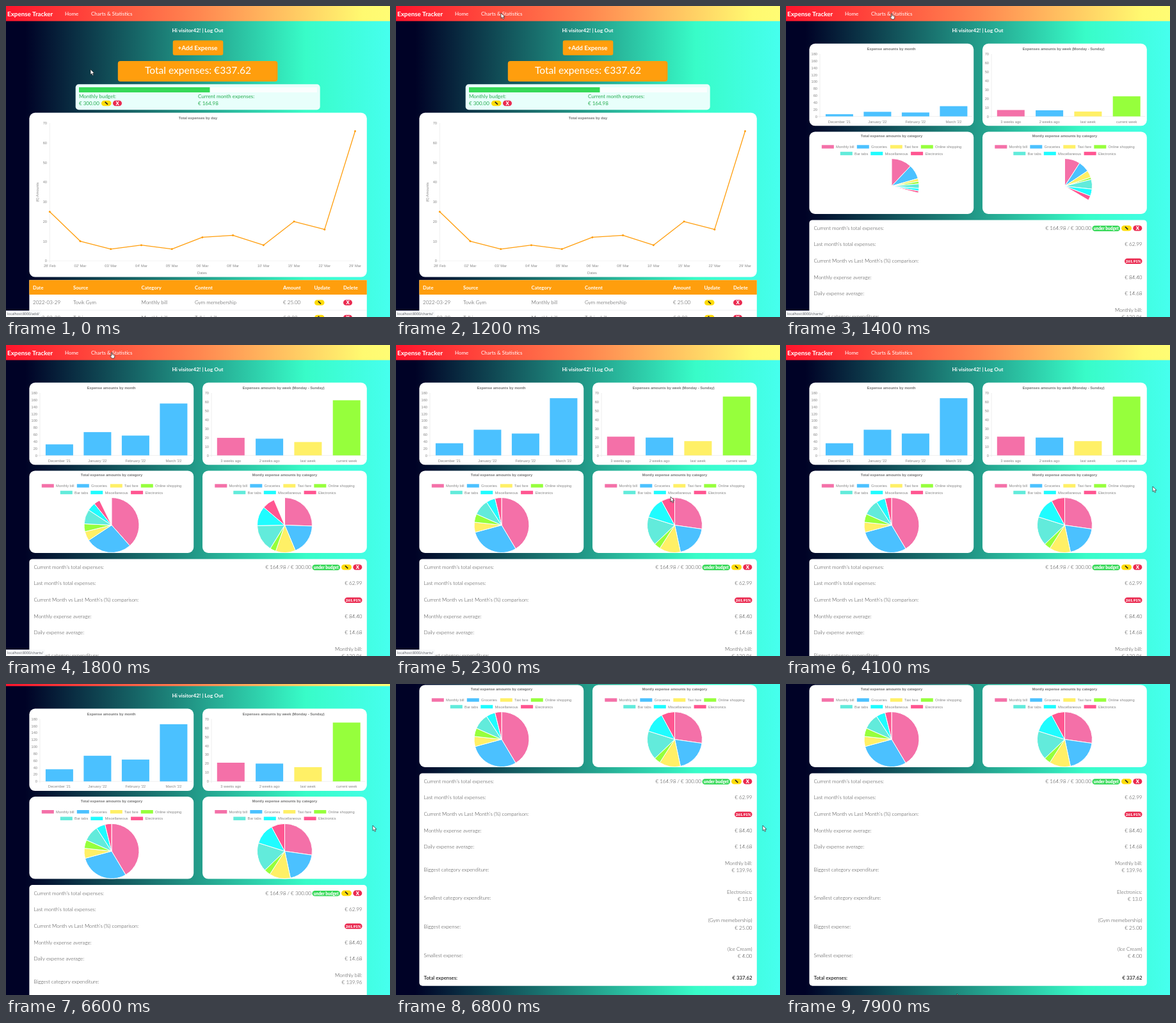
Animation, 600 px wide and 486 px high, one loop 8 s. Source, as an HTML page:

```html
<!DOCTYPE html>
<html lang="en">
<head>
<meta charset="utf-8">
<title>Expense Tracker</title>
<style>
html, body { margin: 0; width: 100%; height: 100%; overflow: hidden; background: #000226; }
svg { display: block; width: 100%; height: 100%; }
text { font-family: Lato, sans-serif; white-space: pre; }
text.c { font-family: "Liberation Sans", Arial, sans-serif; }
text.s { font-family: "Open Sans", sans-serif; }
</style>
</head>
<body>
<svg id="stage" viewBox="0 0 600 486" xmlns="http://www.w3.org/2000/svg"></svg>
<script>
const LOOP = 8000, STEP = 100, PAGE_AT = 1400;
const ORANGE = '#ff9e0d', YELLOW = '#ffdc0a', RED = '#ea2a50', GREEN = '#36d958', INK = '#3c3c3c';
const PINK = '#f470a8', BLUE = '#4bc1ff', LEMON = '#fff066', LIME = '#96ff3c';
const PALETTE = [PINK, BLUE, LEMON, LIME, '#62ebdb', '#1ffcff', '#ff5691'];
const CATEGORIES = ['Monthly bill', 'Groceries', 'Taxi fare', 'Online shopping', 'Bar tabs', 'Miscellaneous', 'Electronics'];
const LEFT = 36.4, WIDTH = 527.4;

const rect = (x, y, w, h, fill, r = 0) =>
  `<rect x="${x}" y="${y}" width="${w}" height="${h}" rx="${r}" fill="${fill}"/>`;

// y is the middle of the capitals
const text = (str, x, y, { size = 8, fill = INK, weight = 300, anchor = 'start', cls = '', extra = '' } = {}) =>
  `<text class="${cls}" x="${x}" y="${(y + size * 0.36).toFixed(2)}" font-size="${size}" fill="${fill}" ` +
  `font-weight="${weight}" text-anchor="${anchor}" ${extra}>${str.replace(/&/g, '&amp;')}</text>`;

const label = (str, x, y, anchor = 'middle', opts = {}) =>
  text(str, x, y, { size: 5.7, fill: '#858585', weight: 400, anchor, cls: 'c', ...opts });

const title = (str, x, y) => label(str, x, y, 'middle', { weight: 700, fill: '#747474' });

const line = (x1, y1, x2, y2, stroke, w = 0.6) =>
  `<path d="M${x1} ${y1}L${x2} ${y2}" stroke="${stroke}" stroke-width="${w}" fill="none"/>`;

const pill = (str, x, y, w, fill, size = 6.4) =>
  rect(x, y - 4.3, w, 8.6, fill, 4.3) +
  text(str, x + w / 2, y, { size, fill: '#fff', weight: 900, anchor: 'middle' });

const editPill = (x, y, w = 15.5) =>
  rect(x, y - 4.3, w, 8.6, YELLOW, 4.3) +
  line(x + w / 2 - 2, y - 2.2, x + w / 2 + 2.2, y + 1.9, '#222', 1.7);

const deletePill = (x, y) => pill('X', x, y, 14, RED, 7.6);

function header() {
  const link = { fill: '#fff', weight: 400 };
  return rect(0, 0, 600, 23.6, 'url(#nav)') +
    text('Expense Tracker', 2, 12, { size: 9.9, fill: '#fff', weight: 700 }) +
    text('Home', 92, 12, link) +
    text('Charts & Statistics', 133, 12, link) +
    text('Hi visitor42! | Log Out', 299.5, 38.5, { size: 8.2, fill: '#fff', weight: 700, anchor: 'middle' });
}

function budget() {
  const g = { fill: '#27ac50', weight: 400 };
  return rect(108.7, 122.3, 382, 40, '#e8fffb', 5) +
    rect(114, 127, 372, 8, '#fafefe') + rect(114, 127, 204.5, 8, GREEN) +
    text('Monthly budget:', 114, 140.7, g) + text('Current month expenses:', 300, 140.7, g) +
    text('€ 300.00', 114, 152, g) + text('€ 164.98', 300, 152, g) +
    editPill(149, 152) + deletePill(167, 152);
}

function lineChart() {
  const days = ["28' Feb", ...['02', '03', '04', '05', '06', '08', '10', '15', '22', '29'].map(d => d + "' Mar")];
  const values = [25, 10, 6, 8, 6, 12, 13, 8, 20, 16, 66];
  const px = i => 68.3 + i * 47.72, py = v => 398.3 - v * 3.073;
  let out = rect(LEFT, 166.8, WIDTH, 256.8, '#fff', 9) + title('Total expenses by day', 300, 175) +
    line(68.3, 183, 68.3, 401, '#e6e6e6') + line(65, 398.3, 545.5, 398.3, '#ededed');
  for (let v = 0; v <= 70; v += 10) out += label(String(v), 64, py(v), 'end');
  out += `<polyline points="${values.map((v, i) => px(i) + ',' + py(v)).join(' ')}" fill="none" stroke="${ORANGE}" stroke-width="1.3" stroke-linejoin="round"/>`;
  values.forEach((v, i) => {
    out += `<circle cx="${px(i)}" cy="${py(v)}" r="1.5" fill="${ORANGE}"/>` + label(days[i], px(i), 406.3);
  });
  return out + label('Dates', 306.5, 417.3) +
    label('(€) Amounts', 49, 291, 'middle', { extra: 'transform="rotate(-90 49 291)"' });
}

function table() {
  const cols = [42, 105, 211.5, 295, 433, 481.5, 527];
  const names = ['Date', 'Source', 'Category', 'Content', 'Amount', 'Update', 'Delete'];
  const rows = [
    ['2022-03-29', 'Tovik Gym', 'Monthly bill', 'Gym memebership', '€ 25.00'],
    ['2022-03-29', 'Talbiro', 'Monthly bill', 'Talbiro bill', '€ 9.99']
  ];
  let out = rect(LEFT, 428.3, WIDTH, 60, '#fff') + rect(LEFT, 428.3, WIDTH, 22.7, ORANGE) +
    line(LEFT, 475.3, LEFT + WIDTH, 475.3, '#e3e6e9');
  names.forEach((n, i) => out += text(n, cols[i], 440, { size: 7.7, fill: '#fff', weight: 700 }));
  rows.forEach((row, r) => {
    const y = 463.5 + r * 23.5;
    row.forEach((s, i) => out += text(s, cols[i], y));
    out += editPill(482, y) + deletePill(527, y);
  });
  return out;
}

function homePage() {
  return header() +
    rect(260.7, 53.7, 78.6, 23.4, ORANGE, 3) +
    text('+Add Expense', 299.5, 66, { size: 9.7, fill: '#fff', weight: 700, anchor: 'middle' }) +
    rect(174.8, 86, 249.6, 32, ORANGE, 4) +
    text('Total expenses: €337.62', 300, 100.5, { size: 15.6, fill: '#fff', weight: 400, anchor: 'middle' }) +
    budget() + lineChart() + table();
}

// Charts that grow on load: each has a start time, fixed parts and draw(progress)
const BASE = 172.5, PLOT = 97.5;
const bars = (id, start, first, gap, axis, max, step, caption, data) => {
  const cx = i => first + i * gap;
  return {
    id, start,
    frame() {
      let out = title(caption, first + gap * 1.5 - 8, 67) + line(axis, 75, axis, 175, '#e2e2e2') +
        line(axis - 3, BASE, cx(3) + 29, BASE, '#e6e6e6');
      for (let v = 0; v <= max; v += step) out += label(String(v), axis - 4, BASE - v / max * PLOT, 'end');
      data.forEach(([name], i) => out += label(name, cx(i), 180.5));
      return out;
    },
    draw: p => data.map(([, v, fill], i) => {
      const h = v / max * PLOT * p;
      return rect(cx(i) - 21.5, BASE - h, 43, h, fill);
    }).join('')
  };
};

const pie = (id, start, cx, caption, values) => ({
  id, start,
  frame() {
    const xs = [56, 111, 163, 211, 85, 132.5, 195.3];
    return title(caption, cx, 203.3) + CATEGORIES.map((name, i) => {
      const x = cx - 165.2 + xs[i], y = i < 4 ? 220 : 230.5;
      return rect(x, y - 2.7, 19, 5.4, PALETTE[i]) + label(name, x + 22.3, y, 'start');
    }).join('');
  },
  draw(p) {
    const cy = 281.5, r = 43, total = values.reduce((a, b) => a + b);
    const at = a => `${(cx + r * Math.sin(a)).toFixed(2)} ${(cy - r * Math.cos(a)).toFixed(2)}`;
    let a = 0;
    return values.map((v, i) => {
      const from = a, span = v / total * Math.PI * 2 * p;
      a += span;
      return `<path d="M${cx} ${cy}L${at(from)}A${r} ${r} 0 ${span > Math.PI ? 1 : 0} 1 ${at(a)}Z" fill="${PALETTE[i]}" stroke="#fff" stroke-width="1"/>`;
    }).join('');
  }
});

const charts = [
  bars('months', 1352, 83.4, 59.5, 53, 180, 20, 'Expense amounts by month',
    [["December '21", 35, BLUE], ["January '22", 74, BLUE], ["February '22", 62.99, BLUE], ["March '22", 164.98, BLUE]]),
  bars('weeks', 1301, 351.3, 60.3, 321, 70, 10, 'Expenses amounts by week (Monday - Sunday)',
    [['3 weeks ago', 21, PINK], ['2 weeks ago', 20, BLUE], ['last week', 16, LEMON], ['current week', 66, LIME]]),
  pie('all', 1318, 165, 'Total expense amounts by category', [139.96, 99, 20, 16.66, 31, 18, 13]),
  pie('month', 1303, 435.5, 'Montly expense amounts by category', [45, 32, 20.5, 6.2, 28, 20.3, 13])
];

function summary() {
  const right = (str, y, opts = {}) => text(str, 556.5, y, { anchor: 'end', ...opts });
  const single = [["Last month's total expenses:", 372.5, '€ 62.99'],
    ["Current Month vs Last Month's (%) comparison:", 398.3, ''],
    ['Monthly expense average:', 424, '€ 84.40'], ['Daily expense average:', 449.5, '€ 14.68']];
  const double = [['Biggest category expenditure:', 'Monthly bill:', '€ 139.96'],
    ['Smallest category expenditure:', 'Electronics:', '€ 13.0'],
    ['Biggest expense:', '(Gym memebership)', '€ 25.00'],
    ['Smallest expense:', '(Ice Cream)', '€ 4.00']];
  const strong = { fill: '#222', weight: 600, size: 7.8 };
  let out = rect(LEFT, 334.4, WIDTH, 332.4, '#fff', 5) +
    text("Current month's total expenses:", 43.5, 347) +
    text('€ 164.98 / € 300.00', 477, 347, { anchor: 'end' }) +
    pill('under budget', 478.5, 347.6, 43.5, GREEN, 6.5) + editPill(524, 347.2, 16) + deletePill(542.3, 347.2) +
    pill('261.91%', 529, 398.8, 27.5, RED, 6);
  single.forEach(([name, y, value]) => out += text(name, 43.5, y) + right(value, y));
  double.forEach(([name, a, b], i) => {
    const y = 485 + i * 44.6;
    out += text(name, 43.5, y) + right(a, y - 9.8) + right(b, y + 1.6);
  });
  return out + text('Total expenses:', 43.5, 654, strong) + right('€ 337.62', 654, strong);
}

function chartsPage() {
  const cards = [[LEFT, 58.8], [307, 58.8], [LEFT, 196.4], [307, 196.4]];
  return header() + cards.map(([x, y]) => rect(x, y, 256.8, 128.5, '#fff', 9)).join('') +
    charts.map(c => `${c.frame()}<g id="${c.id}"></g>`).join('') + summary();
}

const stage = document.getElementById('stage');
stage.innerHTML = `
<defs>
  <linearGradient id="bg"><stop offset=".05" stop-color="#000226"/><stop offset=".78" stop-color="#38fcc8"/><stop offset="1" stop-color="#46ffee"/></linearGradient>
  <linearGradient id="nav"><stop offset="0" stop-color="#ff142c"/><stop offset=".5" stop-color="#ff8650"/><stop offset=".93" stop-color="#fffa70"/><stop offset="1" stop-color="#fffc74"/></linearGradient>
</defs>
${rect(0, 0, 600, 486, 'url(#bg)')}
<g id="home">${homePage()}</g>
<g id="stats">${chartsPage()}</g>
<g id="status"><rect id="tip" y="476" height="10" fill="#f9fafb"/>
<text id="url" class="s" x="2" y="483" font-size="5.4" fill="#50545a"></text></g>
<g id="cursor" stroke="#222" stroke-width=".7" stroke-linejoin="round" fill="#fff">
  <path id="arrow" d="M0 0V8.2L1.9 6.5L3.2 9.5L4.7 8.9L3.4 6H6Z"/>
  <path id="hand" d="M.6 1Q1.3 0 2 1V4L5.2 4.8Q6 5.2 5.8 6.5L5 9.8H1.4L-1.2 6.2Q-1 5 .6 6.2Z"/>
</g>`;

const el = id => document.getElementById(id);
const show = (id, on) => el(id).setAttribute('display', on ? 'inline' : 'none');
const clamp = v => Math.min(1, Math.max(0, v));
const easeOutQuart = v => 1 - (1 - v) ** 4;
const smooth = v => v * v * (3 - 2 * v);

// Cursor stops: time, x, y
const PATH = [[0, 132, 99], [500, 180, 112], [600, 180, 112], [700, 164, 11], [1800, 164, 11], [2300, 429, 237],
  [2700, 200, 280], [2900, 152, 300], [3300, 530, 110], [3600, 548, 235], [3800, 573, 221],
  [6900, 573, 221], [7800, 267, 455], [7900, 267, 484]];

function cursorAt(t) {
  const i = PATH.findIndex(k => k[0] > t);
  if (i < 0) return PATH[PATH.length - 1].slice(1);
  const [t0, x0, y0] = PATH[i - 1], [t1, x1, y1] = PATH[i];
  const u = (t - t0) / (t1 - t0);
  return [x0 + (x1 - x0) * u, y0 + (y1 - y0) * u];
}

function render(t) {
  const onStats = t >= PAGE_AT;
  show('home', !onStats);
  show('stats', onStats);
  if (onStats) {
    charts.forEach(c => el(c.id).innerHTML = c.draw(easeOutQuart(clamp((t - c.start) / 1000))));
    const scroll = 195 * smooth(clamp((t - 6550) / 250));
    el('stats').setAttribute('transform', `translate(0 ${-scroll.toFixed(2)})`);
  }
  const adding = t < 300, linking = t >= 1000 && t < 2500;
  show('status', adding || linking);
  el('url').textContent = 'localhost:8000/' + (adding ? 'add/' : 'charts/');
  el('tip').setAttribute('width', adding ? 55 : 61);

  const hand = t >= 1300 && t < 1900;
  show('hand', hand);
  show('arrow', !hand);
  el('cursor').setAttribute('transform', `translate(${cursorAt(t).join(' ')})`);
}

// The picture advances ten times a second
const begin = performance.now();
let last = -1;
function tick(now) {
  const t = Math.floor(Math.max(0, now - begin) % LOOP / STEP) * STEP;
  if (t !== last) render(last = t);
  requestAnimationFrame(tick);
}
tick(begin);
</script>
</body>
</html>
```
